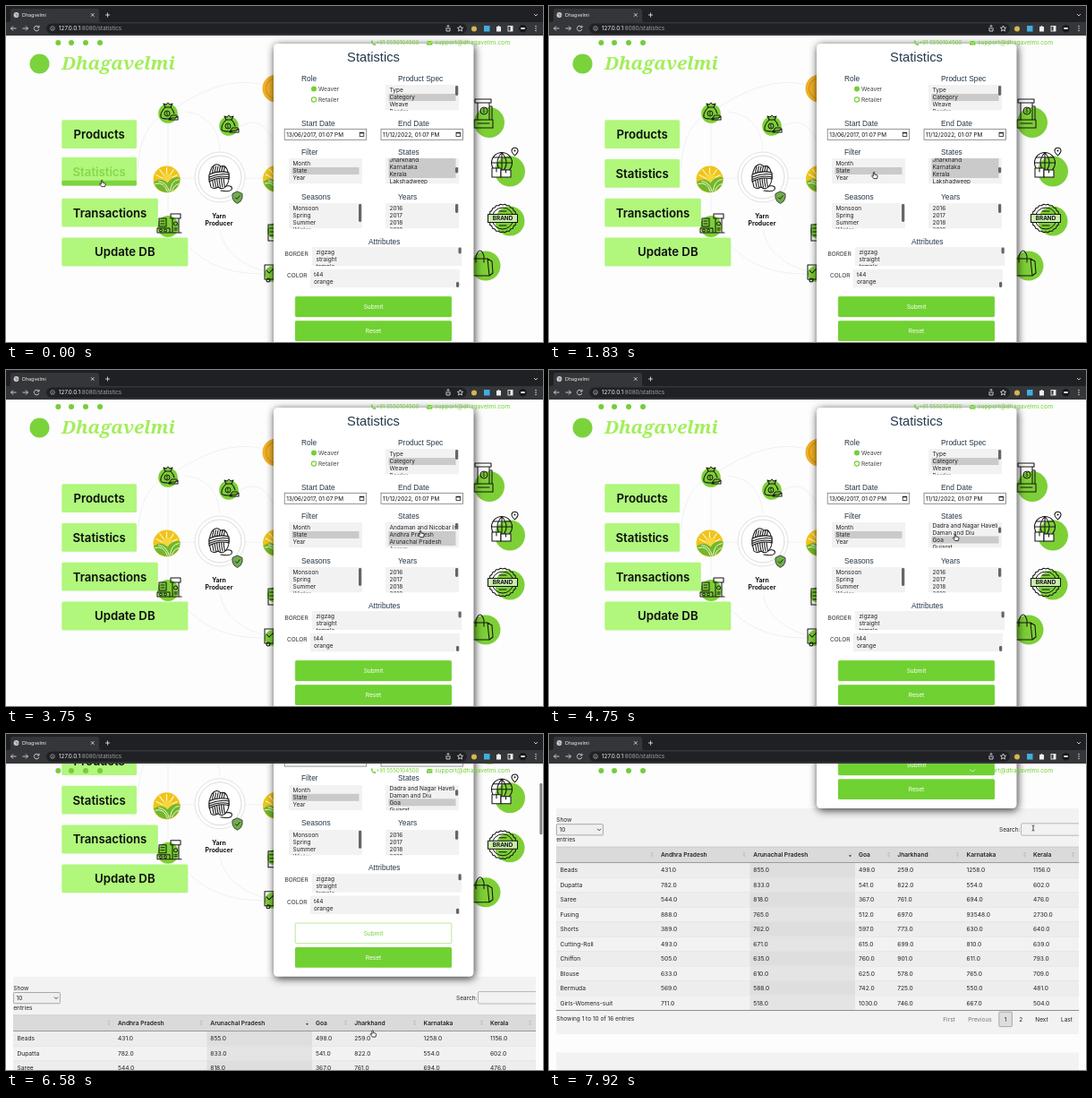
An HTML page that plays this animation: 600 by 375 pixels, repeating every 8 s.

```html
<!DOCTYPE html>
<html lang="en">
<head>
<meta charset="utf-8">
<title>Statistics</title>
<style>
  html, body { margin: 0; width: 100%; height: 100%; overflow: hidden; background: #fdfdfd; }
  svg { display: block; }
  #stage { width: 600px; height: 375px; }
  text { font-family: Inter, 'Open Sans', sans-serif; white-space: pre; }
  .ink { fill: none; stroke: #151515; stroke-width: 1.05; stroke-linejoin: round; stroke-linecap: round; }
  .card { filter: drop-shadow(1px 2px 5px rgba(0, 0, 0, .8)); }
</style>
</head>
<body>
<svg id="stage" viewBox="0 0 600 375"></svg>
<script>
const LOOP = 8000;
const GREEN = '#70d132', LIME = '#b0f77c', LEAF = '#7dcf36', NAVY = '#23384c', INK = '#151515';
const SANS = "'Liberation Sans', Arial, sans-serif";

// Drawing helpers: each returns SVG markup; text is centred vertically on y.
const attrs = o => Object.entries(o).map(([k, v]) => ` ${k}="${v}"`).join('');
const rect = (x, y, w, h, fill, more = {}) =>
  `<rect x="${x}" y="${y}" width="${w}" height="${h}" fill="${fill}"${attrs(more)}/>`;
const disc = (x, y, r, fill, more = {}) => `<circle cx="${x}" cy="${y}" r="${r}" fill="${fill}"${attrs(more)}/>`;
const ring = (x, y, r, stroke, width = 1) => disc(x, y, r, 'none', { stroke, 'stroke-width': width });
const path = (d, more = { class: 'ink' }) => `<path d="${d}"${attrs(more)}/>`;
const text = (x, y, str, size = 6.5, fill = '#222', more = {}) =>
  `<text x="${x}" y="${y + size * .36}" font-size="${size}" fill="${fill}"${attrs(more)}>${str}</text>`;
const centred = { 'text-anchor': 'middle' };
const group = (id, body, more = {}) => `<g id="${id}"${attrs(more)}>${body}</g>`;
const at = (x, y, body) => `<g transform="translate(${x} ${y})">${body}</g>`;

function browserBar() {
  const line = { fill: 'none', stroke: '#d8d9db', 'stroke-width': .9 };
  return rect(0, 0, 600, 33, '#35363a') + rect(0, 0, 600, 18, '#1f2023')
    + path('M3 18Q5 18 5 15V6Q5 3 8 3H101Q104 3 104 6V15Q104 18 106 18Z', { fill: '#35363a' })
    + disc(11.5, 10, 2.9, '#d8d9db') + path('M9.5 9H12.5L11 12M13 11.5L14 10', { fill: 'none', stroke: '#55565a', 'stroke-width': .7 })
    + text(18, 10, 'Dhagvelmi', 5.4, '#eee')
    + path('M95 8.2L98.5 11.7M98.5 8.2L95 11.7M111 10H116M113.5 7.5V12.5M590 9L592 11L594 9', line)
    + rect(45, 19.5, 470, 11.5, '#202124', { rx: 5.75 })
    + path('M11.5 25H5.5M8 22.5L5.5 25L8 27.5M18.5 25H24.5M22 22.5L24.5 25L22 27.5', line)
    + path('M36.3 23.2A2.8 2.8 0 1 0 36.8 26M37 21.8V24H34.7', line)
    + ring(52, 25, 2.3, '#bbb', .7) + rect(51.7, 24.5, .7, 2, '#bbb')
    + text(59, 25, '127.0.0.1<tspan fill="#a2a5a9">:8080/statistics</tspan>', 6.3, '#f1f1f1')
    + path('M492 24V28H496V24M494 26V21.5M492.6 22.8L494 21.4L495.4 22.8', line)
    + path('M507.5 22L508.4 24.1L510.6 24.3L508.9 25.8L509.5 28L507.5 26.8L505.5 28L506.1 25.8L504.4 24.3L506.6 24.1Z', line)
    + disc(523, 25.5, 3, '#d8b64a') + rect(534, 22, 6.5, 6.5, '#3faee0')
    + path('M548 23H549.5A1 1 0 0 1 551.5 23H553V28.5H548Z', { fill: '#eee' })
    + rect(561, 22.5, 5, 5.5, 'none', { stroke: '#eee', 'stroke-width': .9 }) + rect(563.5, 22.5, 2.5, 5.5, '#eee')
    + disc(577.5, 25.3, 4.2, '#17181a') + rect(575, 24, 5, 2, '#ddd', { rx: 1 })
    + [22.5, 25, 27.5].map(y => disc(592, y, .75, '#ddd')).join('');
}

const moneyBag = (x, y) => disc(x, y + 2, 10.8, LEAF) + at(x, y,
  path('M-3 -5Q-9 1 -8 6Q-7 8 0 8H3M3 -5Q6 -2 7 2') + path('M-3 -5L-5 -9L-2 -8L0 -10L2 -8L5 -9L3 -5Z')
  + ring(-1, 2, 3, INK) + text(-1, 2, '$', 4.5, INK, centred) + path('M1 8L4 4H10M4 7H8L11 5V9H1Z'));

const farmBadge = (x, y) => disc(x, y, 15, '#f0c419') + at(x, y,
  path('M-12 -5L-2 0M-8 -11L0 -1M0 -13V-2M8 -11L2 -2M12 -5L4 -1', { stroke: '#fff6cf', 'stroke-width': 1.2 })
  + disc(1, -1, 5.5, '#f6d53f')
  + path('M-14.5 3Q-6 -3 1 4Q7 -4 15 -2A15 15 0 0 1 -14.5 3Z', { fill: '#72b72c' })
  + path('M-13 5Q-3 2 1 14M-9 2Q0 3 3 14M14 0Q5 1 4 13M14 5Q8 6 6 13', { fill: 'none', stroke: '#eef6d8', 'stroke-width': 1 }));

const skein = path('M-9 11Q-13 -1 -8 -11Q-3 -17 2 -12Q8 -14 10 -6Q13 3 8 10Q4 15 -1 11Q-6 14 -9 11Z', { class: 'ink', style: 'fill:#fff' })
  + [-6, -3.5, -1, 1.5, 4, 6.5].map(x => path(`M${x} 11Q${x - 3} -2 ${x} -12`)).join('')
  + path('M-11 -3Q0 -8 11 -5V2Q0 -1 -11 5Z', { class: 'ink', style: 'fill:#fff' })
  + path('M-11 0Q0 -5 11 -3M-11 2.5Q0 -3 11 0M8 10Q16 9 14 14Q11 17 2 15');

function illustration() {
  const faint = { fill: 'none', stroke: '#ececec', 'stroke-width': .8 };
  const white = { class: 'ink', style: 'fill:#fff' };
  const seal = Array.from({ length: 40 }, (_, i) => {
    const r = i % 2 ? 16 : 15, a = i * Math.PI / 20;
    return `${(r * Math.cos(a)).toFixed(1)} ${(r * Math.sin(a)).toFixed(1)}`;
  }).join('L');
  return path('M147 183Q150 130 181 119Q250 70 299 92M181 131V230M192 192H212M266 192H299M200 118Q236 122 239 160M239 250Q245 285 295 298M190 250Q220 300 288 299M260 135Q285 120 299 150', faint)
    + moneyBag(181, 118) + moneyBag(249, 132)
    + disc(302, 92, 15.5, '#eeb027') + ring(302, 92, 11.5, '#d9921c', 1.2)
    + farmBadge(179.5, 193.5) + farmBadge(302, 193)
    + disc(239, 191, 28, '#fff', { stroke: '#e2e2e2' }) + ring(239, 191, 24, '#d9d9d9')
    + at(238, 191, skein)
    + path('M253 209.5L258.5 207L264 209.5V214Q263 218.5 258.5 220.5Q254 218.5 253 214Z', { fill: '#6fae48', stroke: '#444' })
    + path('M256 213.5L258 215.5L261.5 211.5', { fill: 'none', stroke: '#222' })
    + text(238, 235, 'Yarn', 6.9, '#111', { ...centred, 'font-weight': 700 })
    + text(238, 243, 'Producer', 6.9, '#111', { ...centred, 'font-weight': 700 })
    + disc(181, 246, 12, LEAF)
    + at(183, 243, path('M-12 -6H-4V3H-12ZM-10 -3H-6M-10 0H-6M-14 10V5H0V10ZM1 -11H12V-6H1ZM3 -6V9M10 -6V9M0 10H13')
      + ring(6.5, 0, 2, INK) + ring(-10, 7.5, 1.5, INK) + ring(-5, 7.5, 1.5, INK) + path('M5 5H8M5 7H8'))
    + disc(301, 251, 9, LEAF) + path('M293 244H300V262H293ZM295 248H300M295 252H300M295 256H300')
    + disc(298, 299, 9, LEAF) + path('M289 289H299V305H289ZM291 295L294 298L299 293')
    + disc(293, 306, 2, '#fff', { class: 'ink' })
    + disc(540, 130, 17, LEAF)
    + at(533, 118, path('M-9 -10H9V-14H-9ZM-6 -10V9H7V-10M-10 9V18H11V9ZM-6 13H7M7 -6H10V9')
      + ring(1, -1, 4, INK) + text(1, -1, '$', 6, INK, centred))
    + disc(563, 184.5, 17, LEAF)
    + at(554, 175, ring(0, 0, 11.5, INK, 1.1) + path('M-11.5 0H11.5M0 -11.5V10M-9.5 -6H9.5M0 -11.5Q-10 0 0 11M0 -11.5Q10 0 0 11')
      + rect(-11, 6, 10, 10, '#fff', white) + rect(-1, 8, 11, 8, '#fff', white) + path('M-6 6V10M4.5 8V11')
      + path('M14.5 -8Q10.5 -12 11 -14A3.6 3.6 0 0 1 18 -14Q18.5 -12 14.5 -8Z', white) + disc(14.5, -13.5, 1, INK))
    + disc(563, 240, 16.5, LEAF)
    + at(555, 237, path(`M${seal}Z`) + ring(0, 0, 12, INK) + path('M-4 -8H4M-4 8H4')
      + rect(-16.5, -4.5, 33, 9, '#c9edaa', { class: 'ink', style: 'fill:#c9edaa' })
      + text(0, 0, 'BRAND', 6.3, '#111', { ...centred, 'font-weight': 700 }))
    + disc(536, 290, 16.5, LEAF)
    + at(531, 288, path('M-10 -6H7L9 13H-11ZM-6 -2V-9Q-1 -21 3 -9V-2M7 -6L12 -3L13 10L9 13'));
}

const menuButton = (y, w) => rect(62.3, y, w, 31.8, LIME, { rx: 1.5 });
const menuLabel = (y, w, label, more = {}) =>
  text(62.3 + w / 2, y + 16, label, 13.2, '#0c0c0c', { ...centred, 'font-weight': 600, ...more });

function menu() {
  const plain = [[127.3, 83.7, 'Products'], [214.8, 107.5, 'Transactions'], [258.6, 141, 'Update DB']];
  return plain.map(b => menuButton(...b) + menuLabel(...b)).join('')
    + group('hoverButton', menuButton(171, 83.7)
      + group('hoverBar', rect(62.3, 197, 83.7, 5.8, '#7ed43f', { rx: 1.5 }))
      + menuLabel(171, 83.7, 'Statistics', { id: 'hoverLabel' }));
}

// A list box that clips its options; thumb is [offset, length].
function listBox({ x, y, w = 82, h = 28.5, options, picked = [], thumb, id = '' }) {
  const rows = options.map((label, i) => {
    const mid = 6 + i * 8;
    return (picked.includes(i) ? rect(3.5, mid - 4, w - 7, 8, '#cacaca') : '') + text(4.5, mid, label, 6.5);
  }).join('');
  return `<svg x="${x}" y="${y}" width="${w}" height="${h}">` + rect(0, 0, w, h, '#f2f2f2')
    + group(id + 'Rows', rows)
    + (thumb ? rect(w - 4, thumb[0], 3.2, thumb[1], '#666', { rx: 1.4, id: id + 'Thumb' }) : '') + '</svg>';
}

const STATES = ['Andaman and Nicobar Islands', 'Andhra Pradesh', 'Arunachal Pradesh', 'Assam', 'Bihar', 'Chandigarh',
  'Chhattisgarh', 'Dadra and Nagar Haveli', 'Daman and Diu', 'Goa', 'Gujarat', 'Haryana', 'Himachal Pradesh',
  'Jammu and Kashmir', 'Jharkhand', 'Karnataka', 'Kerala', 'Lakshadweep', 'Madhya Pradesh'];

const dateBox = (x, value) => rect(x, 137.3, 91.5, 12, '#fff', { stroke: '#777', 'stroke-width': .8 })
  + text(x + 2, 143.3, value, 6.4, '#111')
  + rect(x + 84, 141.2, 4.6, 4.4, 'none', { stroke: '#222', 'stroke-width': .8 }) + rect(x + 84, 141, 4.6, 1.3, '#222');

function form() {
  const head = (x, y, s, size = 8.4, more = {}) => text(x, y, s, size, NAVY, { style: `font-family:${SANS}`, ...more });
  return rect(299, 42, 223.5, 342, '#fff', { rx: 4.5, class: 'card' })
    + head(410.5, 57.2, 'Statistics', 14.7, centred)
    + head(330, 80.5, 'Role') + head(438, 80.5, 'Product Spec')
    + head(330, 130.5, 'Start Date') + head(438, 130.5, 'End Date')
    + head(330, 162.5, 'Filter') + head(438, 162.5, 'States')
    + head(330, 212.5, 'Seasons') + head(438, 212.5, 'Years') + head(405, 262.5, 'Attributes')
    + disc(344, 92.5, 3, GREEN) + text(349, 92.5, 'Weaver', 6.5, '#444')
    + ring(344, 104.5, 2.6, GREEN, 1.1) + text(349, 104.5, 'Retailer', 6.5, '#444')
    + dateBox(311.2, '13/06/2017, 01:07 PM') + dateBox(419, '11/12/2022, 01:07 PM')
    + listBox({ x: 424, y: 88, options: ['Type', 'Category', 'Weave', 'Border'], picked: [1], thumb: [1, 11] })
    + listBox({ x: 316, y: 170, options: ['Month', 'State', 'Year'], picked: [1] })
    + listBox({ x: 424, y: 170, options: STATES, picked: [1, 2, 9, 14, 15, 16], thumb: [1, 6.5], id: 'states' })
    + listBox({ x: 316, y: 220, options: ['Monsoon', 'Spring', 'Summer', 'Winter'], thumb: [1, 20] })
    + listBox({ x: 424, y: 220, options: ['2016', '2017', '2018', '2019'], thumb: [1, 10] })
    + text(311.5, 276.3, 'BORDER', 6.5, '#333') + text(314, 300.5, 'COLOR', 6.5, '#333')
    + listBox({ x: 342, y: 269, w: 167.5, h: 21, options: ['zigzag', 'straight', 'temple'], thumb: [.5, 7] })
    + listBox({ x: 339.5, y: 293.5, w: 167.5, h: 21, options: ['t44', 'orange'], thumb: [14.5, 6] })
    + rect(323.2, 324.3, 174.6, 22.6, GREEN, { rx: 1.5, id: 'submit', stroke: GREEN, 'stroke-width': .5 })
    + text(410.5, 335.8, 'Submit', 6.6, '#fff', { ...centred, id: 'submitLabel' })
    + rect(323, 351.2, 175, 22.8, GREEN, { rx: 1.5 }) + text(410.5, 362.6, 'Reset', 6.6, '#fff', centred);
}

const COLUMNS = [['', 12.5, 115], ['Andhra Pradesh', 125, 218], ['Arunachal Pradesh', 228.3, 336.5], ['Goa', 346, 379.5],
  ['Jharkhand', 389.3, 456.5], ['Karnataka', 466.5, 531.5], ['Kerala', 541, 585.5]];
const ROWS = `Beads 431 855 498 259 1258 1156
Dupatta 782 833 541 822 554 602
Saree 544 818 367 761 694 476
Fusing 888 765 512 697 93548 2730
Shorts 389 762 597 773 630 640
Cutting-Roll 493 671 615 699 810 639
Chiffon 505 635 760 901 611 793
Blouse 633 610 625 578 765 709
Bermuda 569 588 742 725 550 481
Girls-Womens-suit 711 518 1030 746 667 504`.split('\n').map(r => r.split(' '));

function results() {
  const sorter = (x, active) => path(`M${x - 1.5} 434.8L${x} 432.8L${x + 1.5} 434.8Z`, { fill: active ? '#ccc' : '#b9b9b9' })
    + path(`M${x - 1.5} 436.3L${x} 438.3L${x + 1.5} 436.3Z`, { fill: active ? '#333' : '#b9b9b9' });
  const header = COLUMNS.map(([label, x, arrow], i) =>
    text(x, 435.5, label, 6.65, '#222', { 'font-weight': 600 }) + sorter(arrow, i === 2)).join('');
  const body = ROWS.map((row, r) => {
    const y = 444.7 + r * 16.45, odd = r % 2 === 0;
    return rect(8, y, 584, 16.45, odd ? '#ededed' : '#f2f2f2')
      + rect(224.5, y, 117.5, 16.45, odd ? '#dedede' : '#e4e4e4') + rect(8, y, 584, .5, '#dcdcdc')
      + row.map((v, c) => text(COLUMNS[c][1], y + 8.4, c ? v + '.0' : v, 6.65)).join('');
  }).join('');
  const pager = [['First', 447, '#777'], ['Previous', 481.5, '#777'], ['1', 510, '#222'], ['2', 527.3, '#222'],
    ['Next', 550.5, '#222'], ['Last', 578.5, '#222']];
  return rect(8, 384, 584, 252, '#f2f2f2') + rect(8, 656.5, 584, 100, '#f2f2f2')
    + text(8.3, 396.6, 'Show') + text(8.3, 419, 'entries')
    + rect(8.4, 401.7, 52, 12.2, '#efefef', { stroke: '#777', 'stroke-width': .6, rx: 1 }) + text(11.5, 408, '10')
    + path('M54 406.8L56 408.8L58 406.8', { fill: 'none', stroke: '#333', 'stroke-width': .9 })
    + text(503, 407.7, 'Search:') + rect(527.5, 400.8, 66, 13.4, '#f2f2f2', { stroke: '#aaa', 'stroke-width': .8, rx: 1.5 })
    + rect(592, 395, 8, 25, '#fdfdfd')
    + rect(8, 427, 584, 17.7, '#dadada') + rect(8, 426.7, 584, .7, '#c4c4c4') + header + body
    + rect(8, 444.2, 584, .8, '#8a8a8a') + rect(8, 609, 584, .8, '#777')
    + text(8.3, 619, 'Showing 1 to 10 of 16 entries')
    + rect(502.8, 611.2, 14.6, 16.4, '#dedede', { stroke: '#999', 'stroke-width': .8, rx: 1 })
    + pager.map(([s, x, c]) => text(x, 619.2, s, 6.5, c, centred)).join('');
}

const fixedBar = () => [58.3, 73, 89, 105].map(x => disc(x, 41, 3, '#76cc3c')).join('')
  + path('M408.2 38.6L409.4 38.4L410 40L409.2 40.7Q409.8 42 411 42.5L411.7 41.8L413.2 42.4L413 43.7Q411 44.5 409 42.5Q407.3 40.3 408.2 38.6Z', { fill: GREEN })
  + text(413.2, 41, '+91 5550104500', 6.1, GREEN)
  + path('M470 39H476.4V43.6H470Z', { fill: GREEN }) + path('M470 39.6L473.2 41.9L476.4 39.6', { fill: 'none', stroke: '#fff', 'stroke-width': .6 })
  + text(479, 41, 'support@dhagavelmi.com', 6.8, GREEN);

const cursors = {
  hand: path('M-1.6 -3.3Q-.8 -4.4 -.2 -3.3V-.9L2.4 -.4Q3.3 -.1 3.1 1L2.5 3.6H-1.2L-3.3 .9Q-3.4 -.2 -2.4 .1L-1.6 .8Z',
    { fill: '#fff', stroke: '#111', 'stroke-width': .8 }),
  arrow: path('M0 -3.5V3L1.5 1.7L2.6 4L3.6 3.5L2.5 1.3H4.2Z', { fill: '#111', stroke: '#fff', 'stroke-width': .5 }),
  beam: path('M-1.4 -3Q0 -3 0 -2.2Q0 -3 1.4 -3M0 -2.2V2.2M-1.4 3Q0 3 0 2.2Q0 3 1.4 3', { fill: 'none', stroke: '#222', 'stroke-width': .8 })
};

const stage = document.getElementById('stage');
stage.innerHTML = rect(0, 0, 600, 375, '#fdfdfd')
  + group('page', illustration() + disc(37.5, 64.5, 11, '#7bd33c')
    + text(62, 64, 'Dhagavelmi', 20.7, '#a2ee5a', { style: "font-family:'Noto Serif',serif", 'font-weight': 700, 'font-style': 'italic' })
    + menu() + results() + form())
  + fixedBar()
  + rect(596.3, 0, 3, 57.5, '#858585', { rx: 1.5, id: 'scrollbar' })
  + browserBar()
  + group('cursor', Object.entries(cursors).map(([k, v]) => group(k, v)).join(''));

const el = id => document.getElementById(id);
const move = (id, x, y) => el(id).setAttribute('transform', `translate(${x} ${y})`);
const smooth = p => p * p * (3 - 2 * p);

// Steps are [time, value]; values between them are interpolated.
function track(steps, t, ease = p => p) {
  const next = steps.findIndex(s => s[0] > t);
  if (next < 0) return steps[steps.length - 1][1];
  if (next === 0) return steps[0][1];
  const [t0, a] = steps[next - 1], [t1, b] = steps[next];
  return a + (b - a) * ease((t - t0) / (t1 - t0));
}

const CURSOR = [[0, 108, 198], [350, 108, 198], [1300, 364, 189], [1900, 364, 189], [2450, 464, 184],
  [3300, 464, 183], [4600, 464, 183], [4850, 450, 189], [5050, 450, 189], [5600, 410.5, 334.5], [7000, 410.5, 334.5], [7650, 541, 105]];
const cursorX = CURSOR.map(([t, x]) => [t, x]), cursorY = CURSOR.map(([t, , y]) => [t, y]);
const STATE_SCROLL = [[2500, 116], [3400, 0], [3900, 0], [4650, 58.5]];
const PAGE_SCROLL = [[6250, 0], [6420, 30], [6580, 112.4], [6670, 185], [6750, 245], [6830, 290], [6960, 299], [7100, 301]];
const MENU_HOVER = [[420, 1], [700, 0]];
const SUBMIT_HOVER = [[5480, 0], [5800, 1], [6900, 1], [7200, 0]];
const SCROLLBAR = [[5990, 0], [6000, 1], [7580, 1], [7800, 0]];

const mix = (a, b, p) => `rgb(${a.map((v, i) => Math.round(v + (b[i] - v) * p))})`;
const greenRgb = [112, 209, 50], white = [255, 255, 255];

function draw(t) {
  const scroll = track(PAGE_SCROLL, t);
  move('page', 0, -scroll);

  const list = track(STATE_SCROLL, t, smooth);
  move('statesRows', 0, -list);
  el('statesThumb').setAttribute('y', 1 + list / 13);

  const hover = track(MENU_HOVER, t);
  move('hoverButton', 0, -2.2 * hover);
  el('hoverBar').style.opacity = hover;
  el('hoverLabel').setAttribute('fill', mix([12, 12, 12], [134, 216, 76], hover));

  const lit = track(SUBMIT_HOVER, t);
  el('submit').setAttribute('fill', mix(greenRgb, white, lit));
  el('submitLabel').setAttribute('fill', mix(white, greenRgb, lit));

  el('scrollbar').setAttribute('y', 35 + scroll * .175);
  el('scrollbar').style.opacity = track(SCROLLBAR, t);

  move('cursor', track(cursorX, t, smooth), track(cursorY, t, smooth));
  const shape = t >= 7600 ? 'beam' : t >= 6700 || (t > 500 && t < 1150) ? 'arrow' : 'hand';
  for (const name in cursors) el(name).style.display = name === shape ? '' : 'none';
}

const start = performance.now();
function frame() {
  draw((performance.now() - start) % LOOP);
  requestAnimationFrame(frame);
}
frame();
</script>
</body>
</html>
```
